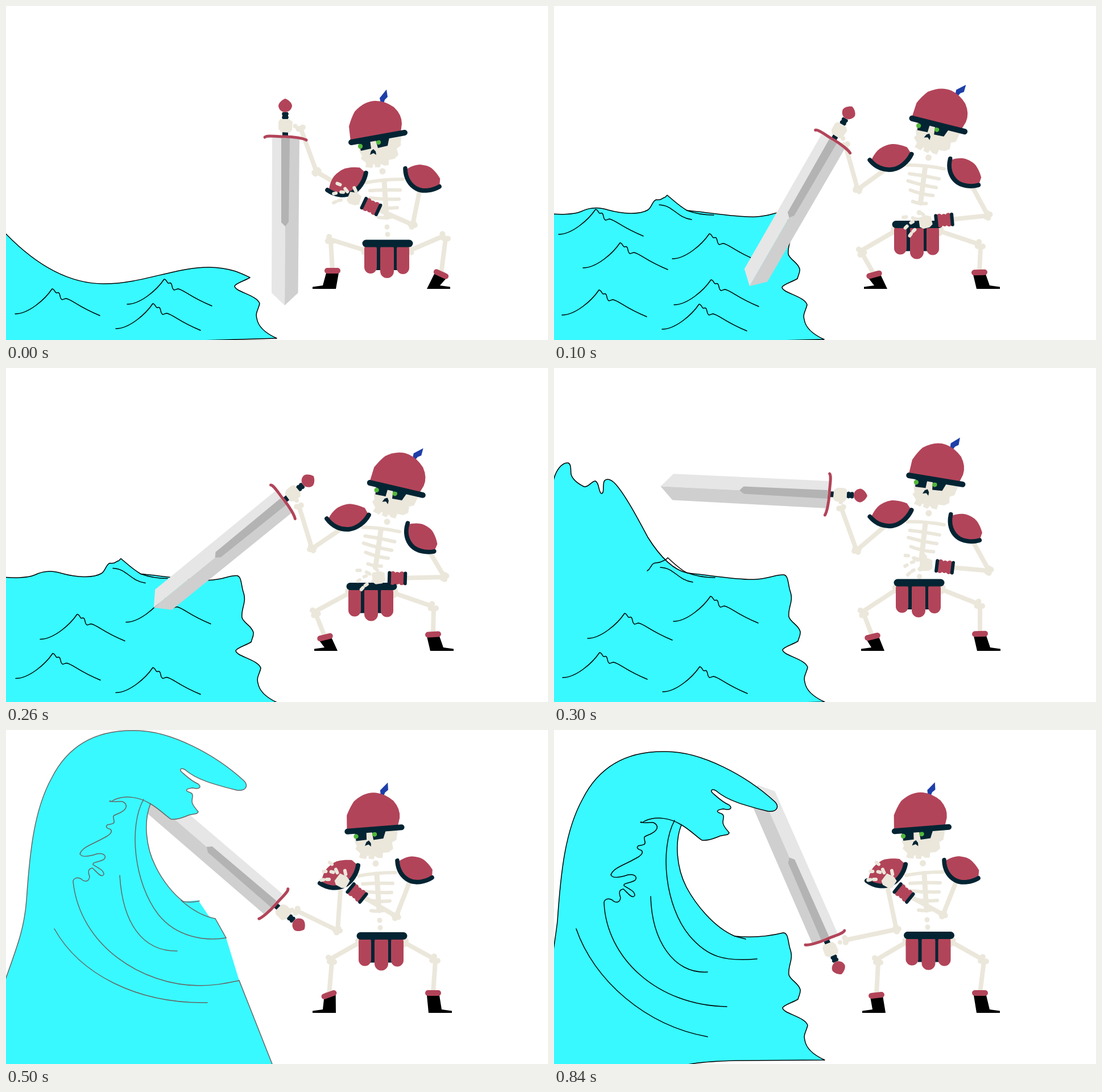
These frames come from a looping animation (953 by 588 pixels, 1000 ms). An HTML page with a canvas:

```html
<!DOCTYPE html>
<html lang="en">
<head>
<meta charset="utf-8">
<title>Skeleton knight and the wave</title>
<style>
html, body { margin: 0; width: 100%; height: 100%; overflow: hidden; background: #fff; }
canvas { display: block; }
</style>
</head>
<body>
<canvas id="stage" width="953" height="588"></canvas>
<script>
const ctx = document.getElementById('stage').getContext('2d');
const RED = '#b24459', DARK = '#032433', BONE = '#ebe7db', SEA = '#38f9ff';
const STEP = 100, LOOP = 1000;

// One row per pose: x, y, degrees
const head = [[654, 231, 0], [676, 209, 24.4], [686.5, 212.5, 23.4], [671.5, 196.5, 19.7],
  [662.5, 179, 18], [648, 174.5, 5.7], [646.5, 174, 5.7]];
const torso = [[662, 291, 0], [653, 266, 11], [660, 267, 12], [653, 256, 10],
  [643, 239, 7], [649, 237, 0], [648, 236, 0]];
const sword = [[491, 233, 0], [490, 238, 29.6], [487, 235, 50.4], [481, 222, 92.5],
  [469, 282, 132], [471, 306, 130.3], [477, 366, 156]];
const padLeft = [[599, 309, -24], [592, 266, -8], [601, 262, -5], [592, 256, -9],
  [583, 244, -12], [585.5, 254, -25], [584, 251, -23]];
const padRight = [[732, 302, 28], [721.5, 292, 43], [729.5, 298, 47], [723, 280.5, 42],
  [715, 260.5, 38.5], [718.5, 245, 26], [716, 245, 28]];
const belt = [[671, 418], [639, 384.5], [643, 384.5], [642, 378], [643, 365], [661, 362.5], [659.5, 361.5]];

// wrist, elbow, shoulder
const swordArm = [[518, 215, 546, 292, 599, 323], [512, 244, 534, 323, 592, 281], [515, 243, 538, 318, 600, 276],
  [505, 246, 532, 321, 592, 270], [504, 293, 577, 331, 572, 258], [511, 318, 583, 353, 589, 268],
  [512, 370, 602, 351, 584, 265]];
// elbow, wristband, hand
const freeArm = [[715, 385, 642, 353, 612, 339], [763, 369, 686, 377, 653, 380], [771, 368, 688, 370, 655, 369],
  [765, 357, 687, 350, 654, 346], [725, 337, 653, 307, 624, 294], [686, 328, 617, 287, 591, 266],
  [684, 325, 615, 287, 589, 266]];
// knee, cuff, cuff tilt, heel
const legLeft = [[567, 410, 574, 466, 0, 580], [538, 432, 563, 473, -15, 586], [541, 430, 561, 474, -14, 583],
  [541, 430, 560, 473, -13, 581], [549, 422, 562, 468, -12, 585], [569, 404, 568, 466, -20, 580],
  [566, 405, 567, 467, -6, 583]];
const legRight = [[769, 405, 765, 472, 25, 740], [746, 419, 748, 469, -2, 743], [748, 419, 751, 469, -3, 746],
  [745, 415, 749, 468, -2, 744], [747, 405, 745, 463, -1, 737], [751, 402, 751, 463, 0, 743],
  [752, 403, 749, 463, 0, 743]];

const fingers = ['M-30-26l5 2', 'M-16-17l4 5', 'M-36-8l4-1', 'M-23-11l4 0', 'M0-19l3 6',
  'M-36 8l4-2', 'M-27 4l4-1'];

// Shoreline, from the step in the ground downwards
const LOW = 'c-10,6 -25,10 -27,15c0,10 40,16 44,31c-2,10 -8,16 -5,26c3,19 24,30 35,35';
const COAST = 'c10,0 8,18 13,31c5,17 -5,27 -3,43c3,10 17,14 20,26c1,6 -3,12 -4,17' + LOW;
const FLOOR = 'L-20,600';
const RIPPLE = 'c24,0 53,-26 65,-44c5,0 5,8 8,7c6,-2 5,3 7,9c3,6 5,1 10,1c12,3 20,14 59,30';
const ripples = (...spots) => spots.map(s => 'M' + s + RIPPLE).join('');

const SWELL = 'M-12,365C10,368 35,367 47,362C65,353 80,354 95,359C120,366 150,368 165,359' +
  'C172,355 173,342 180,341C190,343 190,337 195,337L199,333C210,342 220,352 234,360' +
  'C270,363 325,373 355,371C378,370 388,363 402,363' + COAST + FLOOR;
const SWELL_LINES = 'M185,350C210,351 215,372 242,376M234,360C250,366 265,368 281,368';

const CREST = 'C42,210 50,140 80,85C110,25 160,0 225,1C290,0 370,45 418,89C427,98 422,108 406,106' +
  'C370,97 335,88 315,70C308,66 304,69 309,74C318,82 326,90 338,95C345,101 339,105 328,102' +
  'C318,103 314,106 321,109C332,112 327,117 327,126C328,134 334,138 338,144C336,150 328,146 316,152' +
  'C306,156 298,158 290,157C280,150 268,138 254,130C242,160 245,205 263,240';
const FOAM = 'M254,130C235,118 210,114 190,123C184,128 180,125 183,125C190,128 198,125 205,126' +
  'C216,132 212,140 200,146C186,152 188,150 190,160C191,166 185,165 178,167C174,171 178,173 184,175' +
  'C188,180 182,185 172,190C155,200 135,205 130,218C133,225 148,222 160,218C172,216 178,222 172,228' +
  'C160,234 152,232 153,237C160,242 172,246 172,254C168,262 158,248 152,243C144,244 144,250 147,258' +
  'C146,268 138,268 132,262C124,258 118,262 118,267';
const TALL = 'M-2,442C20,380 32,350 36,300' + CREST + 'C275,265 295,290 312,302';

const waves = [
  { body: 'M-5,396C60,465 120,489 172,489C240,489 300,459 358,460C395,461 412,470 429,478' + LOW + FLOOR,
    lines: ripples('16,542', '213,525', '193,568') },
  { body: SWELL,
    lines: SWELL_LINES + ripples('8,402', '51,461', '208,445', '211,526', '14,544', '190,569') },
  { body: SWELL, at: [3, 2.5],
    lines: SWELL_LINES + ripples('57,475', '208,445', '14,544', '190,569') },
  { body: 'M-2,203C2,180 14,166 25,167C31,170 29,180 30,187C33,198 45,205 53,209C62,210 65,199 73,199' +
      'C80,203 78,217 83,221C90,221 84,205 89,198C95,193 101,197 107,203C125,222 150,270 165,298' +
      'C180,322 205,355 235,361C270,364 325,374 355,372C378,371 388,364 403,364' + COAST + FLOOR,
    lines: 'M164,357C172,352 170,343 180,343C190,343 192,338 196,338L200,334C215,348 230,360 236,361' +
      'M187,351C212,352 217,373 244,377M236,361C252,367 267,369 283,369' +
      ripples('59,476', '210,446', '15,545', '191,570') },
  { body: 'M-2,192C25,125 60,88 104,73C140,55 180,51 212,51C240,52 260,53 270,56C285,62 284,72 270,76' +
      'C245,80 230,89 200,98C188,101 176,99 170,101C165,104 172,106 180,105L208,105C218,107 217,115 210,118' +
      'C200,122 195,126 200,129C206,131 211,127 214,129C218,135 214,139 222,142C232,144 240,145 237,152' +
      'C226,165 220,178 210,184C190,181 175,182 158,183C157,260 185,325 269,362' +
      'C310,368 345,369 360,368C378,366 385,360 395,360' + COAST + FLOOR,
    lines: 'M158,183C140,184 118,188 106,221C101,226 104,221 108,218C118,210 127,211 131,214' +
      'C133,225 122,232 122,237C132,240 130,246 126,250C122,254 124,258 130,260C137,264 134,270 129,282' +
      'C122,300 115,310 113,325C115,333 126,331 134,321C140,310 147,303 153,306C155,316 146,321 150,327' +
      'C158,329 168,316 169,321C172,332 150,337 148,341C155,345 165,339 172,341C190,348 185,357 174,355L166,348' +
      'M145,185C132,230 145,320 185,345C210,355 240,358 269,362M138,359C150,353 165,352 185,353C215,355 240,360 269,362' +
      ripples('44,472', '199,442', '-1,541', '180,566') },
  { body: TALL + 'L338,300L357,328L368,332L387,366L410,441L468,588' + FLOOR, ink: '#666', over: true,
    edge: TALL + 'C322,304 332,303 340,301M308,300C325,315 345,328 368,332L387,366M410,441L468,588',
    lines: FOAM + 'C130,380 240,450 340,450C370,450 390,445 410,441' +
      'M242,122C215,170 225,270 268,325C300,365 350,372 387,366' +
      'M200,256C205,340 240,390 301,389M85,350C130,430 230,482 354,480' },
  { body: 'M20,410C30,345 33,325 36,300' + CREST + 'C278,268 310,310 348,326C380,329 405,327 433,320' + COAST +
      'L350,545C310,546 280,549 265,552L10,560', at: [-30, 37], over: true,
    lines: FOAM + 'C122,363 210,448 334,450M242,122C215,173 225,273 268,325C300,363 330,371 387,366' +
      'M200,256C202,333 240,393 300,389M69,313C100,403 190,483 300,503M348,326L367,331' }
];

function at([x, y, deg = 0], draw) {
  ctx.save();
  ctx.translate(x, y);
  ctx.rotate(deg * Math.PI / 180);
  draw();
  ctx.restore();
}

function fill(d, color) {
  ctx.fillStyle = color;
  ctx.fill(new Path2D(d));
}

function stroke(d, color, width) {
  ctx.strokeStyle = color;
  ctx.lineWidth = width;
  ctx.stroke(new Path2D(d));
}

function dot(x, y, r, color) {
  ctx.fillStyle = color;
  ctx.beginPath();
  ctx.arc(x, y, r, 0, 7);
  ctx.fill();
}

function bone(x1, y1, x2, y2) {
  stroke(`M${x1},${y1}L${x2},${y2}`, BONE, 8);
  const a = Math.atan2(y2 - y1, x2 - x1), nx = -Math.sin(a) * 4, ny = Math.cos(a) * 4;
  for (const [x, y] of [[x1, y1], [x2, y2]]) {
    dot(x + nx, y + ny, 5, BONE);
    dot(x - nx, y - ny, 5, BONE);
  }
}

function drawWave({ body, edge = body, lines, at: place = [0, 0], ink = '#000' }) {
  at(place, () => {
    fill(body, SEA);
    stroke(edge, ink, 1.5);
    stroke(lines, ink, 1.5);
  });
}

function drawSword() {
  fill('M-23-1L1-1L-1 294L-24 272Z', '#e6e6e6');
  fill('M1-1L25-1L22.5 272L-1 294Z', '#cfcfcf');
  fill('M-7 0L8 0L6 147L0 155L-7 148Z', '#b3b3b3');
  fill('M-5-46h10v41h-10z', DARK);
  stroke('M-4-43h8M-4-37h8', DARK, 4);
  stroke('M-36-2C-32-6-15-3 0-3S32 0 37 3', RED, 5);
  fill('M-9-34L7-34L13-29L12-15L8-10L-8-11L-12-17L-12-29Z', BONE);
  fill('M0-70C6-68 12-62 12-57C11-50 5-46 0-46C-6-46-11-50-12-57C-12-62-6-68 0-70', RED);
}

function drawTorso() {
  stroke('M3 17L7 81', BONE, 9);
  stroke('M-29 20Q0 14 36 14M-22 34Q5 32 31 33M-22 47Q5 50 29 49M-15 62Q5 66 26 64M-7 81Q5 83 17 80', BONE, 6);
  dot(8, 98, 4.5, BONE);
  dot(9, 111, 4.5, BONE);
}

function drawPad() {
  fill('M-35 2C-30-8-20-17-13-19C-5-22 3-23 8-22C18-20 26-16 31-13L37 0C22 26-20 28-35 2Z', RED);
  stroke('M-37 0C-28 15-14 22 0 22S29 12 37 0', DARK, 8);
}

function drawHead() {
  dot(8, 60, 5.5, BONE);
  fill('M-36 10L-32 26L-28 33L-30 38L-21 45L-22 53L-10 54L-8 48L-6 47L-5 53L4 53L5 47L11 50L19 49' +
    'L19 40L29 38L36 31L33 20L40 15L41-5Z', BONE);
  fill('M-34 9L-14 5L-12 20L-30 24ZM-4 5L20 0L17 15L0 19Z', DARK);
  fill('M-14 31L-12 24L-8 21L-4 25L-3 31L-8 28Z', DARK);
  dot(-31, 16, 4.2, '#52b83a');
  dot(1, 9, 4.2, '#52b83a');
  fill('M15-84L17-71L12-66L10-59L5-60L3-69Z', '#1e3fa8');
  fill('M-48 8L-51-19Q-47-34-41-45Q-24-64-4-64Q12-64 28-53Q42-40 42-24L40-8Z', RED);
  stroke('M-47 9L47-8', DARK, 10);
}

function drawBelt() {
  fill('M-20 5h38v42h-38z', DARK);
  stroke('M-30 10V42M27 10V43', RED, 22);
  stroke('M-1 10V49', RED, 24);
  stroke('M-38 0H38', DARK, 13);
}

function drawLeg([kx, ky, cx, cy, tilt, heel], [bx, by], dir) {
  bone(bx + dir * 40, by + 12, kx, ky);
  bone(kx + 4, ky + 4, cx, cy);
  const a = tilt * Math.PI / 180, c = Math.cos(a), s = Math.sin(a);
  const top = side => `${cx + side * 11 * c - 4 * s},${cy + side * 11 * s + 4 * c}`;
  const toe = heel + dir * 41;
  fill(`M${top(-dir)}L${heel},498L${toe},498L${toe},494.5L${heel + dir * 23},492L${top(dir)}Z`, '#000');
  at([cx, cy, tilt], () => stroke('M-9 0H9', RED, 10));
}

function drawSwordArm([wx, wy, ex, ey, sx, sy]) {
  bone(wx, wy, ex, ey);
  bone(ex, ey, sx, sy);
}

function drawThumb([wx, wy], [x, y, deg]) {
  const a = deg * Math.PI / 180;
  const hx = x + 22 * Math.sin(a), hy = y - 22 * Math.cos(a);
  dot(wx + (hx - wx) * 0.35, wy + (hy - wy) * 0.35 - 2, 4, BONE);
}

function drawForearm([ex, ey, bx, by, hx, hy]) {
  const deg = Math.atan2(by - hy, bx - hx) * 180 / Math.PI;
  bone(ex, ey, bx, by);
  at([hx, hy, deg - 24], () => {
    fill('M-7-12L6-10L13-4L9 10L2 12L-9 9L-13 3Z', BONE);
    fingers.forEach(d => stroke(d, BONE, 6));
  });
  at([bx, by, deg], () => {
    stroke('M-8-7V7M0-6V6M8-7V7', RED, 10);
    stroke('M-14-9V9M14-9V9', DARK, 6);
  });
}

function drawPose(i) {
  ctx.fillStyle = '#fff';
  ctx.fillRect(0, 0, 953, 588);
  ctx.lineCap = ctx.lineJoin = 'round';
  const wave = waves[i], [ex, ey] = freeArm[i], [px, py] = padRight[i];

  if (!wave.over) drawWave(wave);
  drawSwordArm(swordArm[i]);
  at(sword[i], drawSword);
  drawThumb(swordArm[i], sword[i]);
  if (wave.over) drawWave(wave);

  at(torso[i], drawTorso);
  bone(px, py, ex, ey);
  at(padLeft[i], drawPad);
  at(padRight[i], () => { ctx.scale(0.92, 1); drawPad(); });
  drawLeg(legLeft[i], belt[i], -1);
  drawLeg(legRight[i], belt[i], 1);
  at(belt[i], drawBelt);
  at(head[i], drawHead);
  drawForearm(freeArm[i]);
}

function tick() {
  const t = performance.now() % LOOP;
  drawPose(Math.min(waves.length - 1, Math.floor(t / STEP)));
  requestAnimationFrame(tick);
}
tick();
</script>
</body>
</html>
```
